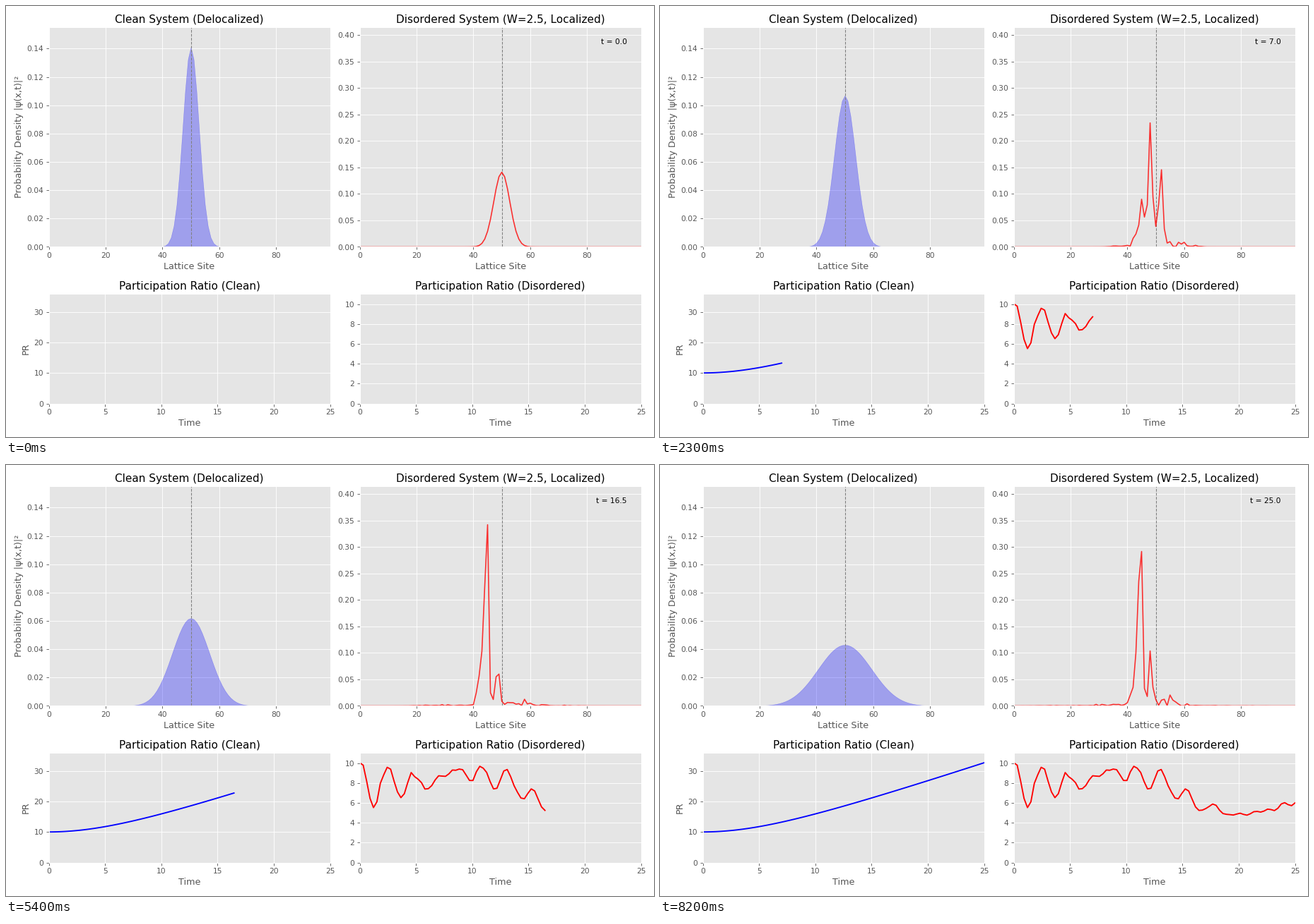
A matplotlib script that plays this animation: 917 px wide and 611 px high, repeating every 8.3 s.

```python
import numpy as np
import matplotlib.pyplot as plt
from matplotlib.animation import FuncAnimation

WIDTH, HEIGHT, DPI = 917, 611, 76.4
FRAMES, INTERVAL = 83, 100
SITES, CENTER, SIGMA = 100, 50, 4.0
W, T_END = 2.5, 25.0

x = np.arange(SITES)
times = np.linspace(0, T_END, FRAMES)


def evolve(potential):
    """Density (time, site) of a Gaussian packet on a hopping chain."""
    hopping = np.eye(SITES, k=1) + np.eye(SITES, k=-1)
    energy, modes = np.linalg.eigh(np.diag(potential) - hopping)
    packet = np.exp(-(x - CENTER) ** 2 / (2 * SIGMA ** 2))
    weights = modes.T @ (packet / np.linalg.norm(packet))
    psi = (np.exp(-1j * np.outer(times, energy)) * weights) @ modes.T
    return np.abs(psi) ** 2


def participation(rho):
    return 1 / (rho ** 2).sum(axis=1)


# Each chain takes one row of draws: the clean one with zero width
draws = np.random.RandomState(42).uniform(-0.5, 0.5, (2, SITES))
clean = evolve(0 * draws[0])
dirty = evolve(W * draws[1])
clean_pr, dirty_pr = participation(clean), participation(dirty)

plt.style.use("ggplot")
plt.rcParams["font.family"] = "DejaVu Sans"
fig = plt.figure(figsize=((WIDTH + 1e-6) / DPI, (HEIGHT + 1e-6) / DPI), dpi=DPI)


def panel(left, top, height, title, xlabel, xmax, peak, ylabel=""):
    ax = fig.add_axes([left / WIDTH, 1 - (top + height) / HEIGHT,
                       398 / WIDTH, height / HEIGHT])
    ax.set(title=title, xlabel=xlabel, ylabel=ylabel,
           xlim=(0, xmax), ylim=(0, 1.1 * peak))
    return ax


def density_panel(left, title, rho, ylabel=""):
    ax = panel(left, 30, 311.5, title, "Lattice Site", SITES - 1,
               rho.max(), ylabel)
    ax.axvline(CENTER, color="gray", ls="--", lw=1)
    return ax


def ratio_line(left, title, pr, color, ylabel=""):
    ax = panel(left, 408, 155.7, title, "Time", T_END, pr.max(), ylabel)
    return ax.plot([], [], color=color, lw=1.75)[0]


LEFT, RIGHT = 60.5, 500.6
ax_clean = density_panel(LEFT, "Clean System (Delocalized)", clean,
                         "Probability Density |ψ(x,t)|²")
ax_dirty = density_panel(RIGHT, f"Disordered System (W={W}, Localized)", dirty)
clean_line = ratio_line(LEFT, "Participation Ratio (Clean)", clean_pr,
                        "blue", "PR")
dirty_line = ratio_line(RIGHT, "Participation Ratio (Disordered)", dirty_pr,
                        "red")

fill = ax_clean.fill_between(x, clean[0], color="blue", alpha=0.3)
wave, = ax_dirty.plot(x, dirty[0], color="red", alpha=0.8, lw=1.5)
clock = ax_dirty.text(0.95, 0.95, "", transform=ax_dirty.transAxes,
                      ha="right", va="top", fontsize=10)


def draw(i):
    outline = np.column_stack([np.r_[x, x[::-1]], np.r_[clean[i], 0 * x]])
    fill.set_verts([outline])
    wave.set_ydata(dirty[i])
    clean_line.set_data(times[:i + 1], clean_pr[:i + 1])
    dirty_line.set_data(times[:i + 1], dirty_pr[:i + 1])
    clock.set_text(f"t = {times[i]:.1f}")
    return fill, wave, clean_line, dirty_line, clock


anim = FuncAnimation(fig, draw, frames=FRAMES, interval=INTERVAL,
                     repeat=True, repeat_delay=0)
plt.show()
```
